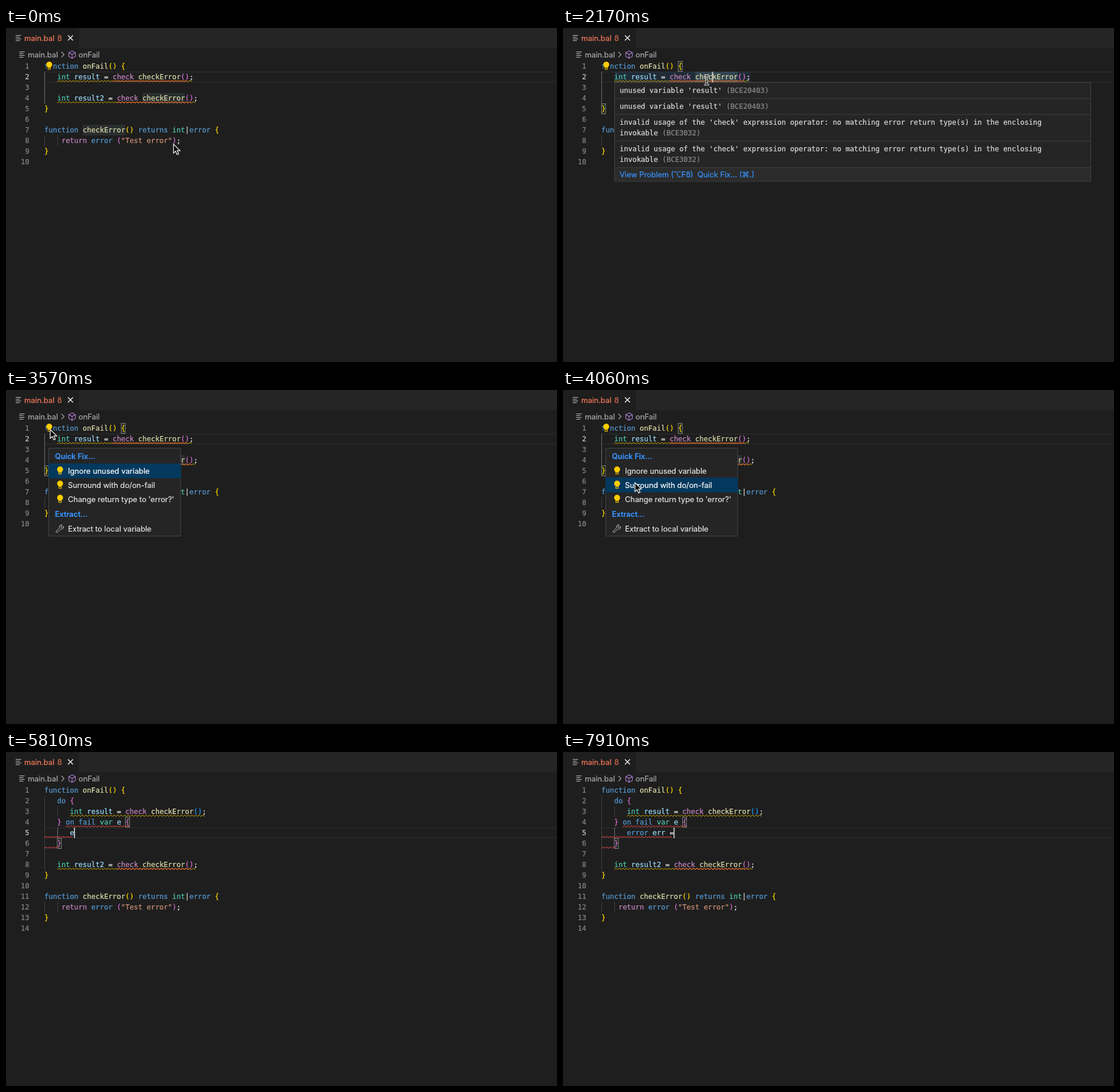
Animation, 934 px wide and 566 px high, one loop 8000 ms. Source, as an HTML page:

```html
<!DOCTYPE html>
<html lang="en">
<head>
<meta charset="utf-8">
<title>Quick fix in an editor</title>
<style>
  html, body { margin: 0; width: 100%; height: 100%; overflow: hidden; background: #1e1e1e; }
  svg { display: block; width: 934px; height: 566px; }
  text, tspan { white-space: pre; fill: currentColor; stroke: currentColor; stroke-width: .22px; }
  .mono { font: 12px "DejaVu Sans Mono", monospace; color: #dcdcdc; }
  .ui { font: 12.8px Inter, "DejaVu Sans", sans-serif; color: #e4e4e4; }
  .head { font-size: 12.6px; font-weight: 600; }
  .link { color: #3794ff; }
  .dim { color: #a9a9a9; }
</style>
</head>
<body>
<svg id="stage" viewBox="0 0 934 566"></svg>
<script>
const LOOP = 8000, STEP = 70, LEFT = 65, CHAR = 7.224, ROW = 18;
const YELLOW = '#d0ab00', RED = '#f14c4c';
const colX = c => LEFT + c * CHAR;
const rowY = n => 56 + (n - 1) * ROW;
const esc = s => s.replace(/&/g, '&amp;').replace(/</g, '&lt;');
const clamp = v => Math.max(0, Math.min(1, v));
const between = (t, a, b) => t >= a && t < b;

const rect = (x, y, w, h, fill, more = '') =>
  `<rect x="${x}" y="${y}" width="${w}" height="${h}" fill="${fill}" ${more}/>`;
const panel = (x, y, w, h) => rect(x + .5, y + .5, w - 1, h - 1, '#252526', 'stroke="#454545"');
const path = (d, stroke, width = 1, fill = 'none') =>
  `<path d="${d}" stroke="${stroke}" stroke-width="${width}" fill="${fill}"/>`;
const label = (x, mid, s, cls = 'ui', color = '') =>
  `<text x="${x}" y="${mid + 4.5}" class="${cls}"${color && ` style="color:${color}"`}>${s}</text>`;

// Code before and after the fix
const tail = `
function checkError() returns int|error {
    return error ("Test error");
}
`;
const codeBefore = `function onFail() {
   int result = check checkError();

   int result2 = check checkError();
}
${tail}`.split('\n');
const codeAfter = typed => `function onFail() {
   do {
      int result = check checkError();
   } on fail var e {
      ${typed}
   }

   int result2 = check checkError();
}
${tail}`.split('\n');

const wordColors = [
  [/^(function|returns|error|do|on|fail)$/, '#569cd6'],
  [/^(return|check)$/, '#c586c0'],
  [/^(int|var)$/, '#4ec9b0'],
  [/^(onFail|checkError)$/, '#dcdcaa'],
  [/^"/, '#ce9178'],
  [/^\w/, '#9cdcfe']
];
const bracketColors = ['#ffd700', '#da70d6', '#179fff'];

function codeText(lines, active) {
  let depth = 0;
  const color = token => {
    if (/[({]/.test(token)) return bracketColors[depth++ % 3];
    if (/[)}]/.test(token)) return bracketColors[--depth % 3];
    return (wordColors.find(([re]) => re.test(token)) || [0, '#dcdcdc'])[1];
  };
  return lines.map((line, i) => {
    const y = rowY(i + 1) + 13;
    const spans = line.replace(/"[^"]*"|\w+|[^\w\s]/g, tok => `\u0001${tok}\u0002`)
      .split(/[\u0001\u0002]/)
      .map(s => s.trim() ? `<tspan style="color:${color(s)}">${esc(s)}</tspan>` : s).join('');
    return `<text x="39.5" y="${y}" class="mono" text-anchor="end" style="color:${
      i + 1 === active ? '#c6c6c6' : '#858585'}">${i + 1}</text>` +
      `<text x="${LEFT}" y="${y}" class="mono">${spans}</text>`;
  }).join('');
}

const squiggle = ([row, from, to, color]) => {
  const n = Math.floor((to - from) * CHAR / 6);
  return path(`M${colX(from)} ${rowY(row) + 17.2}` + 'l3 -2.3l3 2.3'.repeat(n), color);
};
const guide = ([col, from, to, on]) =>
  rect(Math.round(colX(col)), rowY(from), 1, (to - from + 1) * ROW, on ? '#707070' : '#404040');
const bracketBox = ([row, col]) =>
  rect(colX(col) + .3, rowY(row) + .5, 6.8, 17, '#0064001a', 'stroke="#888"');
const wordBox = (row, col, fill) => rect(colX(col), rowY(row), 10 * CHAR, ROW, fill);
const activeLine = row => path(`M66 ${rowY(row) + .5}H932m0 17H66`, '#2a2a2a', 1.4);
const caretAt = (row, col) => rect(colX(col) - .4, rowY(row), 1.8, ROW, '#c8c9c7');

const bulb = (x, y) => `<g transform="translate(${x} ${y})">` +
  path('M-2.4 3.4 C-2.4 1.6 -5 1.2 -5 -2 A5 5 0 0 1 5 -2 C5 1.2 2.4 1.6 2.4 3.4Z', 'none', 0, '#ffcc00') +
  path('M-2 3.5V6H2V3.5', '#ffcc00', 1.1) + '</g>';
const gutterBulb = row => rect(68.5, rowY(row) + 1, 10.5, 16, '#1e1e1e') + bulb(73.3, rowY(row) + 8);

const listIcon = (x, y) => path(`M${x} ${y - 4.5}h9m-9 3h7m-7 3h9m-9 3h7`, '#c5c5c5', 1.1);

const chrome = rect(0, 0, 934, 566, '#1e1e1e') + rect(124, 0, 810, 34, '#252526') +
  listIcon(16.5, 17) +
  label(31, 17, 'main.bal', 'ui', '#f3795a') +
  label(87, 17, '8', 'ui', '#d0674c') +
  path('M105 12.5l8.5 8.5m0 -8.5l-8.5 8.5', '#fff', 1.3) +
  listIcon(22.5, 45) + label(37, 45, 'main.bal', 'ui dim') +
  path('M94 40.5l4.5 4.5l-4.5 4.5', '#a9a9a9', 1.1) +
  path('M112 38.8l5.6 3v6.4l-5.6 3.2l-5.6 -3.2v-6.4zM106.4 41.8l5.6 3l5.6 -3M112 44.8v6.6', '#b180d7', 1.1) +
  label(123, 45, 'onFail', 'ui dim');

const note = (mid, s, code) =>
  label(96, mid, `${s} <tspan style="color:#8a8a8a">(${code})</tspan>`, 'mono');
const usage = mid =>
  label(96, mid, "invalid usage of the 'check' expression operator: no matching error return type(s) in the enclosing", 'mono') +
  note(mid + 18, 'invokable', 'BCE3032');
const hoverCard = panel(87, 92, 808, 168.5) + rect(88, 237, 806, 22.5, '#2c2c2d') +
  path('M88 119.5H894M88 146.5H894M88 191.5H894M88 236.5H894', '#3d3d3e') +
  note(105.5, "unused variable 'result'", 'BCE20403') +
  note(132.5, "unused variable 'result'", 'BCE20403') +
  usage(159.5) + usage(204.5) +
  label(96, 248, 'View Problem (⌥F8)', 'ui link') +
  label(228, 248, 'Quick Fix... (⌘.)', 'ui link');

const fixes = ['Ignore unused variable', 'Surround with do/on-fail', "Change return type to 'error?'"];
const fixMenu = chosen => panel(72, 98, 224.5, 150) +
  rect(72, 124.5 + chosen * 24, 224.5, 25, '#04395e') +
  label(83, 112.5, 'Quick Fix...', 'ui head link') +
  fixes.map((s, i) => bulb(91.7, 136.5 + i * 24) +
    label(105, 137 + i * 24, s, 'ui', i === chosen ? '#fff' : '')).join('') +
  label(83, 210, 'Extract...', 'ui head link') +
  path('M85.2 239l5.4 -5.4a3.7 3.7 0 0 1 4.6 -4.8l-2.2 2.2l.5 1.8l1.8 .5l2.2 -2.2a3.7 3.7 0 0 1 -4.8 4.6l-5.4 5.4a1.5 1.5 0 0 1 -2.1 -2.1z', '#c5c5c5') +
  label(105, 235, 'Extract to local variable');

const suggestions = x => panel(x + 430, 146, 286, 58) + panel(x, 146, 431, 58) +
  rect(x + 1, 147, 429, 18, '#04395e') +
  ['error', 'error?', 'error[]'].map((s, i) => label(x + 22, 155.5 + i * 18, s, 'mono')).join('');

// Pointer
const route = [
  [0, 284, 197], [70, 274, 144], [210, 274, 144], [840, 249, 88], [910, 249, 88],
  [1050, 246, 87], [1330, 246, 87], [1610, 243.5, 88], [2170, 243.5, 88], [2940, 75, 67],
  [3570, 75, 67], [4060, 122, 157], [4340, 122, 157], [4410, 126, 154.5], [4900, 126, 154.5],
  [5320, 122, 138], [LOOP, 122, 138]
];
function pointerAt(t) {
  const i = route.findIndex(p => p[0] > t);
  const [a, b] = [route[i - 1], route[i]];
  const u = (t - a[0]) / (b[0] - a[0]), k = u * u * (3 - 2 * u);
  return [a[1] + (b[1] - a[1]) * k, a[2] + (b[2] - a[2]) * k];
}
const arrow = path('M0 0V15L3.5 11.8L6 17.5L8.6 16.4L6.2 10.8H11Z', '#fff', 1.2, '#000');
const beamShape = 'M-4 -8H-2Q0 -8 0 -6V6Q0 8 -2 8H-4M4 -8H2Q0 -8 0 -6M0 6Q0 8 2 8H4M-2.5 2H2.5';
const beam = path(beamShape, '#fff', 3.2) + path(beamShape, '#000', 1.2);

// Typing
const typing = [[5740, 1], [6230, 2], [6300, 3], [6440, 4], [6580, 5], [6650, 6],
  [6860, 7], [6930, 9], [7560, 10], [7910, 11]];
const typedAt = t => 'error err ='.slice(0, typing.reduce((n, [at, len]) => t >= at ? len : n, 0));

function editorBefore(t) {
  const focused = between(t, 1050, 3080), clicked = t >= 840;
  const shade = focused ? '#353e41' : '#2a2e2f';
  const hover = clamp((t - 1400) / 140) * (t < 2520);
  const caret = between(t, 840, 1330) || between(t, 1820, 2310) || between(t, 2800, 3080);
  return activeLine(2) +
    (focused ? wordBox(2, 22, shade) : '') + wordBox(4, 23, shade) + wordBox(7, 9, shade) +
    (hover ? rect(colX(3), 74, 32 * CHAR, ROW, '#264f78', `opacity="${.25 * hover}"`) : '') +
    [[0, 2, 4, 1], [0, 8, 8], [3, 8, 8]].map(guide).join('') +
    (clicked ? [[1, 18], [5, 0]].map(bracketBox).join('') : '') +
    codeText(codeBefore, 2) +
    [[2, 3, 35, YELLOW], [2, 16, 34, RED], [4, 3, 36, YELLOW], [4, 17, 35, RED]].map(squiggle).join('') +
    (caret ? caretAt(2, 26) : '') + gutterBulb(1) +
    (hover ? `<g opacity="${hover}">${hoverCard}</g>` : '');
}

function editorAfter(t) {
  const typed = typedAt(t), end = 6 + typed.length;
  const moved = t >= 5180, row = moved ? 5 : 3, broken = t >= 5810;
  const marks = [[3, 6, 38, YELLOW], [8, 3, 36, YELLOW], [8, 17, 35, RED]];
  if (t < 5530) marks.push([3, 19, 37, RED]);
  if (t >= 4480) {
    const c = broken ? RED : YELLOW;
    marks.push([4, broken ? 5 : 0, 20, c], [5, 0, end, c], [6, 0, 4, c]);
  }
  const guides = [[0, 2, 8], [3, 3, 3, !moved], [0, 12, 12], [3, 12, 12]];
  if (moved) guides.push([3, 5, 5, 1]);
  const caret = t < 4980 || moved;
  return activeLine(row) + guides.map(guide).join('') +
    (moved ? [[4, 19], [6, 3]] : [[2, 6], [4, 3]]).map(bracketBox).join('') +
    codeText(codeAfter(typed), row) + marks.map(squiggle).join('') +
    (caret ? (moved ? caretAt(5, end) : caretAt(3, 29)) : '') +
    (between(t, 4480, 5180) ? gutterBulb(3) : '') +
    (between(t, 5950, 6650) ? suggestions(colX(end)) : '');
}

function scene(t) {
  const [x, y] = pointerAt(t), menu = between(t, 3150, 4340);
  const asArrow = t < 70 || menu || (t < 4340 && x < 82);
  return chrome + (t < 4410 ? editorBefore(t) : editorAfter(t)) +
    (menu ? fixMenu(y < 149 ? 0 : 1) : '') +
    (t < 5740 ? `<g transform="translate(${x} ${y})">${asArrow ? arrow : beam}</g>` : '');
}

const stage = document.getElementById('stage');
const start = performance.now();
let shown = -1;
function tick() {
  const t = (performance.now() - start) % LOOP;
  const now = Math.min(Math.floor(t / STEP) * STEP, 7910);
  if (now !== shown) stage.innerHTML = scene(shown = now);
  requestAnimationFrame(tick);
}
tick();
</script>
</body>
</html>
```
